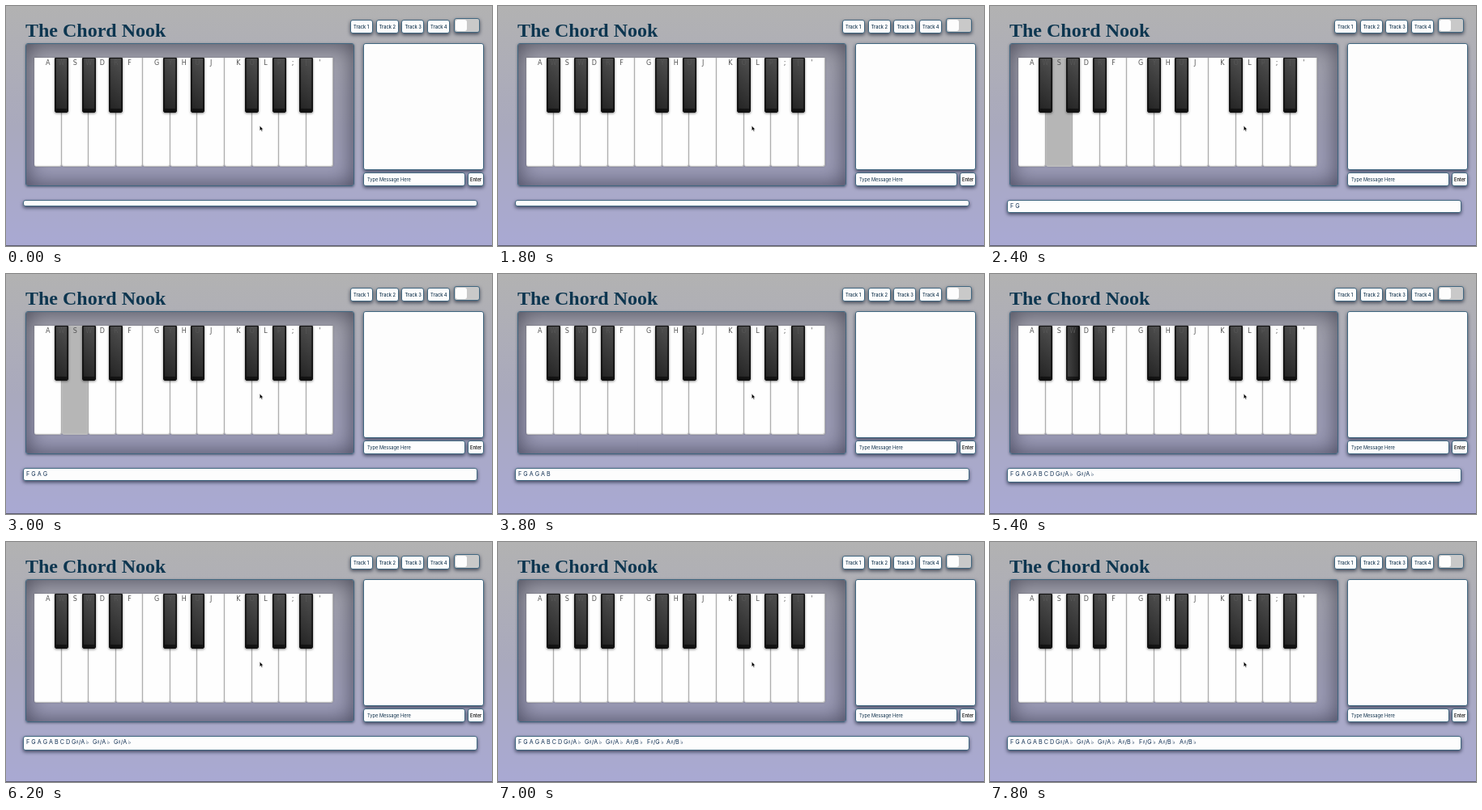
Write an HTML page that moves like this. It is 600 px wide and 297 px high and loops after 8 s.

```html
<!DOCTYPE html>
<html lang="en">
<head>
<meta charset="utf-8">
<title>Piano</title>
<style>
html, body { margin: 0; width: 100%; height: 100%; overflow: hidden; }
body { position: relative; background: linear-gradient(#b2b2b2, #a9a9bd 50%, #a9a9d3); }
div, svg { position: absolute; box-sizing: border-box; }
svg { left: 0; top: 0; }
.box { background: #fdfdfd; border: 1px solid #416780; border-radius: 3px; box-shadow: 0 2px 4px rgba(10, 20, 40, .65); }
.panel { background: rgba(120, 120, 145, .25); box-shadow: inset 0 0 28px rgba(25, 25, 40, .65), 0 1px 3px rgba(10, 20, 40, .5); }
.toggle { background: #c9c9c9; }
.knob { background: #fdfdfd; border-radius: 3px; }
.white { background: #fefefe; border: solid #bbb; border-width: 0 1px 1px 0; border-radius: 0 0 3px 3px;
  box-shadow: inset 0 0 2px #ccc, 0 0 2px rgba(0, 0, 0, .25); }
.white.on { background: #b6b6b6; }
.black { background: linear-gradient(45deg, #222, #505050); border: 1px solid #111; border-radius: 0 0 2px 2px;
  box-shadow: inset 0 -3px 1px 1px rgba(0, 0, 0, .55), 0 1px 3px rgba(0, 0, 0, .5); }
.black.on { background: linear-gradient(to right, #444, #222); }
.floor { background: #5e5e72; }
text { font-family: Inter, "DejaVu Sans", sans-serif; }
.title { font: bold 24px "Liberation Serif", serif; fill: #0d3650; }
.small { font-size: 5.7px; font-weight: 500; fill: #0d2f4a; }
.label { font: 8px "DejaVu Sans", sans-serif; text-anchor: middle; fill: #555; }
.dim { fill: #555; }
.notes { font-size: 7.2px; fill: #0d2c50; }
</style>
</head>
<body>
<script>
const WHITE_W = 33.58, LEFT = 35, TOP = 64;
const svg = document.createElementNS('http://www.w3.org/2000/svg', 'svg');
svg.setAttribute('width', 600);
svg.setAttribute('height', 297);

function box(cls, x, y, w, h) {
  const el = document.createElement('div');
  el.className = cls;
  el.style.cssText = `left:${x}px;top:${y}px;width:${w}px;height:${h}px`;
  document.body.append(el);
  return el;
}

function text(cls, x, y, content) {
  const el = document.createElementNS(svg.namespaceURI, 'text');
  el.setAttribute('class', cls);
  el.setAttribute('x', x);
  el.setAttribute('y', y);
  el.textContent = content;
  svg.append(el);
  return el;
}

text('title', 24, 38, 'The Chord Nook');
for (let i = 0; i < 4; i++) {
  box('box', 425 + 31.7 * i, 17, 28, 17);
  text('small', 429 + 31.7 * i, 27.5, 'Track ' + (i + 1));
}
box('box toggle', 553, 15, 32, 18);
box('knob', 555, 17, 14, 14);
box('box panel', 24, 46, 406, 177);
box('box', 441, 46, 149, 157);
box('box', 441, 206, 126, 17);
text('small', 446, 216.5, 'Type Message Here').style.fontWeight = 400;
box('box', 570, 206, 20, 17);
text('small', 573, 216.5, 'Enter').style.fill = '#000';
box('floor', 0, 296, 600, 1);
const bar = box('box', 20.5, 239.5, 561, 8);

const keys = {};
[..."ASDFGHJKL;'"].forEach((label, i) => {
  keys[label] = box('white', LEFT + WHITE_W * i, TOP, WHITE_W, 135);
  text('label', LEFT + WHITE_W * (i + .5), 73, label);
});
// Black keys sit on the boundary after the given number of white keys.
[[1, 'W'], [2, 'W'], [3, 'R'], [5, 'Y'], [6, 'U'], [8, 'O'], [9, 'P'], [10, '[']].forEach(([n, label]) => {
  const x = LEFT + WHITE_W * n;
  keys['b' + n] = box('black', x - 8.5, TOP, 17, 67.5);
  text('label dim', x, 73, label);
});

// start, end, key, note, x position of the note
const presses = [
  [2000, 2200, 'A', 'F', 25], [2200, 2600, 'S', 'G'], [2600, 2800, 'D', 'A'], [2800, 3200, 'S', 'G'],
  [3200, 3400, 'D', 'A'], [3400, 3800, 'F', 'B'], [4000, 4200, 'G', 'C'], [4200, 4600, 'H', 'D'],
  [5000, 5200, 'b2', 'G♯/A♭', 81], [5400, 5600, 'b2', 'G♯/A♭', 107], [5800, 6000, 'b2', 'G♯/A♭', 133],
  [6400, 6600, 'b3', 'A♯/B♭', 158], [6600, 6800, 'b1', 'F♯/G♭', 184],
  [6800, 7000, 'b3', 'A♯/B♭', 208], [7200, 7400, 'b3', 'A♯/B♭', 234]
].map(([start, end, key, note, x]) => ({ start, end, key, note, x }));

const melody = text('notes', 25, 250, '');
const accidentals = presses.slice(8).map(p => {
  const el = text('notes', p.x, 250, p.note.slice(0, -1));
  const flat = document.createElementNS(svg.namespaceURI, 'tspan');
  flat.setAttribute('dx', 1.5);
  flat.textContent = '♭';
  el.append(flat);
  return el;
});

const cursor = document.createElementNS(svg.namespaceURI, 'path');
cursor.setAttribute('d', 'M313.3 148.3v6l1.4-1.2 1 2.1 1-.5-1-2h1.9z');
cursor.setAttribute('fill', '#000');
cursor.setAttribute('stroke', '#fff');
cursor.setAttribute('stroke-width', .4);
svg.append(cursor);
document.body.append(svg);

function draw(now) {
  const t = now % 8000;
  const played = presses.filter(p => t >= p.start);
  const held = played.filter(p => t < p.end).map(p => p.key);
  for (const name in keys) keys[name].classList.toggle('on', held.includes(name));
  melody.textContent = played.slice(0, 8).map(p => p.note).join(' ');
  accidentals.forEach((el, i) => el.style.display = i + 8 < played.length ? '' : 'none');
  bar.style.height = (played.length > 8 ? 18 : played.length ? 16 : 8) + 'px';
  requestAnimationFrame(draw);
}
draw(0);
</script>
</body>
</html>
```
